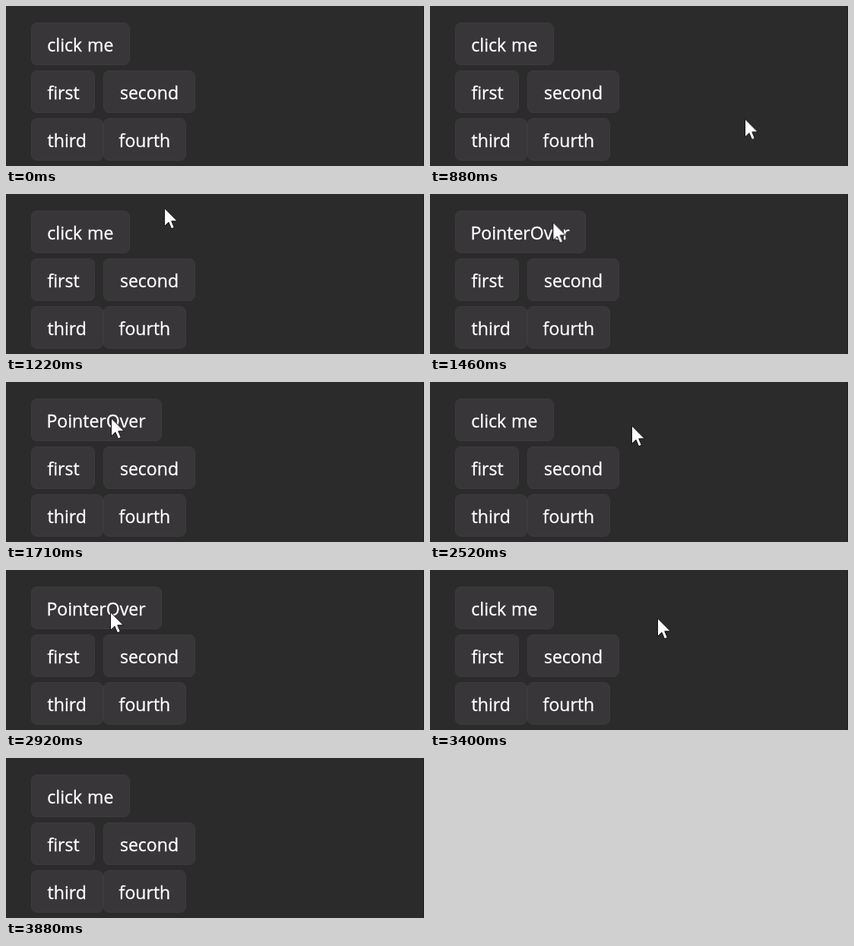
Recreate the animation shown at these times as an HTML page. Size 550 by 211 pixels, loop 4.62 s.

```html
<!DOCTYPE html>
<html lang="en">
<head>
<meta charset="utf-8">
<title>Button hover states</title>
<style>
  html, body { margin: 0; width: 100%; height: 100%; overflow: hidden; background: #2c2b2c; }
  svg { display: block; width: 550px; height: 211px; }
  rect { fill: #393639; stroke: #3e3b3f; }
  text {
    fill: #fff;
    stroke: #fff;
    stroke-width: .35px;
    font: 23.1px "Open Sans", "Noto Sans", sans-serif;
    font-variant-ligatures: none;
    word-spacing: 1px;
  }
  .edge { fill: #1c1e1c; stroke: none; }
  .rest, .over, .cursor { animation: 4620ms step-end infinite; }
  .rest { animation-name: rest; }
  .over { animation-name: over; }
  .cursor {
    fill: #fff;
    stroke: #111;
    stroke-linejoin: round;
    animation-name: move, show;
  }

  @keyframes rest {
    0%, 45.84%, 69.04% { visibility: visible; }
    31.53%, 61.75% { visibility: hidden; }
  }
  @keyframes over {
    0%, 45.84%, 69.04% { visibility: hidden; }
    31.53%, 61.75% { visibility: visible; }
  }
  @keyframes show {
    0%, 83.98% { visibility: hidden; }
    17.31% { visibility: visible; }
  }

  /* The pointer is sampled about every 65 ms, so each stretch moves in steps. */
  @keyframes move {
    0%     { transform: translate(469px, 191px); }
    17.31% { transform: translate(469px, 191px); animation-timing-function: steps(3); }
    21.86% { transform: translate(304px, 63px); animation-timing-function: steps(3); }
    26.4%  { transform: translate(208px, 18px); }
    27.48% { transform: translate(196px, 24px); }
    28.78% { transform: translate(184px, 30px); animation-timing-function: steps(3); }
    32.9%  { transform: translate(150px, 40px); animation-timing-function: steps(3); }
    37.01% { transform: translate(138px, 47px); }
    38.52% { transform: translate(138px, 52px); }
    41.55% { transform: translate(148px, 52px); animation-timing-function: steps(2); }
    44.41% { transform: translate(190px, 54px); animation-timing-function: steps(3); }
    48.7%  { transform: translate(264px, 57px); }
    54.54% { transform: translate(265px, 57px); animation-timing-function: steps(3); }
    58.87% { transform: translate(190px, 56px); animation-timing-function: steps(3); }
    63.2%  { transform: translate(137px, 55px); }
    64.71% { transform: translate(136px, 57px); }
    66.01% { transform: translate(142px, 58px); animation-timing-function: steps(2); }
    69.04% { transform: translate(215px, 58px); animation-timing-function: steps(3); }
    73.59% { transform: translate(299px, 63px); animation-timing-function: steps(2); }
    76.19% { transform: translate(344px, 157px); }
    77.92% { transform: translate(400px, 172px); animation-timing-function: steps(3); }
    82.46% { transform: translate(540px, 200px); }
    100%   { transform: translate(540px, 200px); }
  }
</style>
</head>
<body>
<svg viewBox="0 0 550 211">
  <rect class="edge" x="549" width="1" height="211"/>

  <g class="rest">
    <rect x="33.5" y="22.5" width="129" height="55" rx="7"/>
    <text x="54.3" y="60">click me</text>
  </g>
  <g class="over">
    <rect x="33.5" y="22.5" width="171" height="55" rx="7"/>
    <text x="53.4" y="60">PointerOver</text>
  </g>

  <rect x="33.5" y="85.5" width="83" height="55" rx="7"/>
  <text x="54.4" y="123">first</text>
  <rect x="128.5" y="85.5" width="120" height="55" rx="7"/>
  <text x="149.9" y="123">second</text>

  <rect x="33.5" y="148.5" width="94" height="55" rx="7"/>
  <text x="54.6" y="186">third</text>
  <rect x="128.5" y="148.5" width="108" height="55" rx="7"/>
  <text x="148.6" y="186">fourth</text>

  <path class="cursor" d="M.5 .8V24.5L6 19.3 9.6 27.8 13.4 26.2 9.8 17.8H17.4Z"/>
</svg>
</body>
</html>
```
